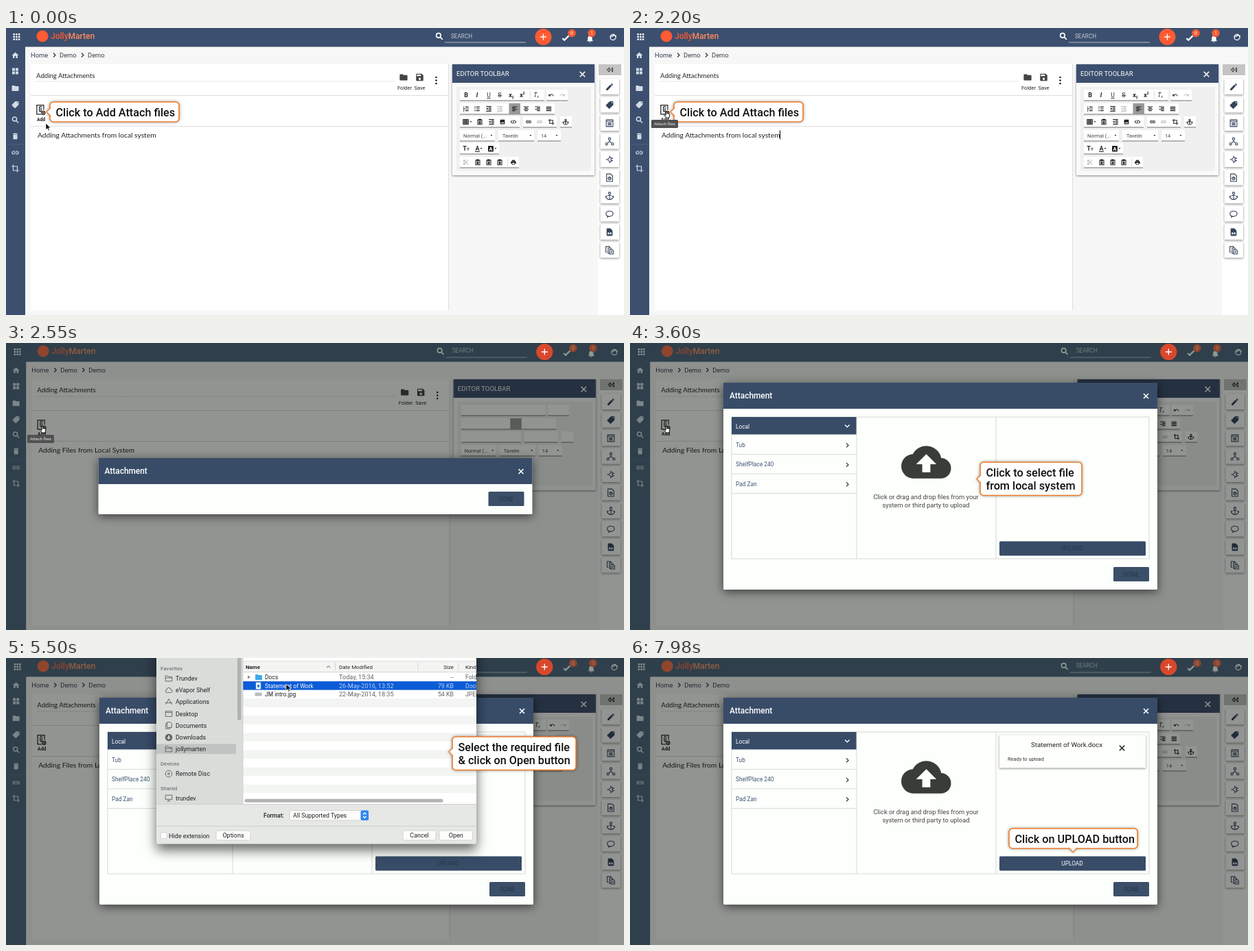
Animation, 900 px wide and 419 px high, one loop 8000 ms. Source, as an HTML page:

```html
<!DOCTYPE html>
<html lang="en">
<head>
<meta charset="utf-8">
<title>Adding attachments</title>
<style>
html, body { margin: 0; width: 100%; height: 100%; overflow: hidden; background: #f7f7f7; }
svg { display: block; width: 100vw; height: 100vh; font-family: Roboto, sans-serif; }
.sh { filter: drop-shadow(0 1px 1.5px #0007); }
.tip { filter: drop-shadow(0 0 2px #0006); }
.deep { filter: drop-shadow(0 3px 7px #0009); }
.float { filter: drop-shadow(0 9px 9px #0009); }
</style>
</head>
<body>
<svg id="stage" viewBox="0 0 900 419"></svg>
<script>
const NAVY = '#3c4f6e', ORANGE = '#ff5a32', INK = '#222', LATO = 'font-family="Lato, sans-serif"';

// Icons on a 24 unit grid; a leading ~ means stroked instead of filled.
const icons = {
  home: 'M10 20v-6h4v6h5v-8h3L12 3 2 12h3v8z',
  dash: 'M3 3h8v8H3zM13 3h8v8h-8zM3 13h8v8H3zM13 13h8v8h-8z',
  folder: 'M10 4H4a2 2 0 0 0-2 2v12a2 2 0 0 0 2 2h16a2 2 0 0 0 2-2V8a2 2 0 0 0-2-2h-8z',
  tag: 'M2.6 11.6l9-9A2 2 0 0 1 13 2h7a2 2 0 0 1 2 2v7a2 2 0 0 1-.6 1.4l-9 9a2 2 0 0 1-2.8 0l-7-7a2 2 0 0 1 0-2.8zM18.5 7a1.5 1.5 0 1 0 0-3 1.5 1.5 0 0 0 0 3z',
  search: '~M15 15l6 6M16 10a6 6 0 1 1-12 0 6 6 0 0 1 12 0',
  trash: 'M6 19a2 2 0 0 0 2 2h8a2 2 0 0 0 2-2V7H6zM19 4h-3.5l-1-1h-5l-1 1H5v2h14z',
  link: '~M11 8H7a4 4 0 0 0 0 8h4M13 8h4a4 4 0 0 1 0 8h-4M8 12h8',
  crop: '~M6 1v17h17M1 6h17v17',
  save: 'M17 3H5a2 2 0 0 0-2 2v14a2 2 0 0 0 2 2h14a2 2 0 0 0 2-2V7zM12 19a3 3 0 1 1 0-6 3 3 0 0 1 0 6zM15 9H5V5h10z',
  edit: 'M3 17.2V21h3.8L17.8 9.9l-3.7-3.7zM20.7 7a1 1 0 0 0 0-1.4l-2.3-2.3a1 1 0 0 0-1.4 0l-1.8 1.8 3.7 3.7z',
  bell: 'M12 22a2 2 0 0 0 2-2h-4a2 2 0 0 0 2 2zM18 16v-5c0-3-1.6-5.6-4.5-6.3V4a1.5 1.5 0 0 0-3 0v.7C7.6 5.4 6 8 6 11v5l-2 2v1h16v-1z',
  check: '~M2 12l6 6L22 4',
  undo: 'M12.5 8c-2.7 0-5 1-6.9 2.6L2 7v9h9l-3.6-3.6A8 8 0 0 1 20 16l2.4-.8A10.5 10.5 0 0 0 12.5 8z',
  redo: 'M11.5 8c2.7 0 5 1 6.9 2.6L22 7v9h-9l3.6-3.6A8 8 0 0 0 4 16l-2.4-.8A10.5 10.5 0 0 1 11.5 8z',
  anchor: '~M12 22V8a3 3 0 1 1 .1 0M7 11h10M2 13a10 9 0 0 0 20 0M2 17v-4h4M22 17v-4h-4',
  chat: '~M8 18c-9-3-7-14 4-14s13 11 2 14.5c-2 .5-3 0-4 0l-5 3z',
  note: '~M3 3h18v18H3zM3 7h18M7 11h10M7 14h10M7 17h10',
  share: '~M12 8v4L6 17M12 12l6 5M15 5a3 3 0 1 1-6 0 3 3 0 0 1 6 0M7 19a3 3 0 1 1-6 0 3 3 0 0 1 6 0M23 19a3 3 0 1 1-6 0 3 3 0 0 1 6 0',
  plug: '~M2 12h5l5-6h4v12h-4l-5-6M16 9h5M16 15h5M12 2v4M12 18v4',
  history: '~M4 2h11l5 5v15H4zM16 14a4 4 0 1 1-8 0 4 4 0 0 1 8 0M12 11v3h2',
  doc: 'M6 2a2 2 0 0 0-2 2v16a2 2 0 0 0 2 2h12a2 2 0 0 0 2-2V8l-6-6zM7 13h4v5H7zM13 13h4v5h-4z',
  copies: '~M5 17H2V2h10v4M8 6h8v4M8 6v14h4M12 10h7l3 3v9H12zM15 15h4M15 18h4',
  clip: '~M13 22H3V1h16v11M13 7v7a2 2 0 0 1-4 0V7a2.5 2.5 0 0 1 5-1M22 19a4 4 0 1 1-8 0 4 4 0 0 1 8 0M18 17v4M16 19h4',
  ol: '~M9 5h13M9 12h13M9 19h13M3 3v4M2 11h4M2 14h4M3 17v5',
  ul: '~M9 5h13M9 12h13M9 19h13M2 5h4M2 12h4M2 19h4',
  indent: '~M2 3h20M12 9h10M12 15h10M2 21h20M2 12h7M6 9l3 3-3 3',
  left: '~M2 4h20M2 9h12M2 14h20M2 19h12', mid: '~M2 4h20M6 9h12M2 14h20M6 19h12',
  right: '~M2 4h20M10 9h12M2 14h20M10 19h12', full: '~M2 4h20M2 9h20M2 14h20M2 19h20',
  table: '~M2 3h20v18H2zM2 9h20M2 15h20M9 3v18M15 3v18',
  image: 'M21 19V5a2 2 0 0 0-2-2H5a2 2 0 0 0-2 2v14a2 2 0 0 0 2 2h14a2 2 0 0 0 2-2zM8.5 13.5l2.5 3 3.5-4.5 4.5 6H5z',
  code: '~M8 6l-6 6 6 6M16 6l6 6-6 6M13 5l-2 14',
  cut: '~M8 8l13 13M8 16L21 3M8 6a3 3 0 1 1-6 0 3 3 0 0 1 6 0M8 18a3 3 0 1 1-6 0 3 3 0 0 1 6 0',
  paste: '~M4 4h16v18H4zM8 2h8v4H8zM8 11h8M8 15h8M8 18h8',
  print: 'M19 8H5a3 3 0 0 0-3 3v6h4v4h12v-4h4v-6a3 3 0 0 0-3-3zM16 19H8v-5h8zM18 3H6v4h12z',
  cloud: 'M19.35 10A7.5 7.5 0 0 0 5.35 8 6 6 0 0 0 6 20h13a5 5 0 0 0 .35-10zM14 13v4h-4v-4H7l5-5 5 5z',
  mist: '~M6 19a4 4 0 0 1 0-8 6 6 0 0 1 12-1 4.5 4.5 0 0 1 1 9z',
  apps: '~M3 20L12 3l9 17M1 15h22', desk: '~M2 4h20v16H2zM2 8h20',
  docs: '~M7 2h10l4 4v12H7zM7 6H3v16h13v-4',
  down: 'M12 1a11 11 0 1 0 .1 0zM10 6h4v6h4l-6 6-6-6h4z',
  disc: '~M22 12a10 10 0 1 1-20 0 10 10 0 0 1 20 0M15 12a3 3 0 1 1-6 0 3 3 0 0 1 6 0',
  screen: '~M2 3h20v13H2zM12 16v5M7 21h10',
  dir: '~M2 4h8l2 3h10v13H2zM2 10h20'
};

const R = (x, y, w, h, fill, more = '') => `<rect x="${x}" y="${y}" width="${w}" height="${h}" fill="${fill}" ${more}/>`;
const O = (x, y, r, fill, more = '') => `<circle cx="${x}" cy="${y}" r="${r}" fill="${fill}" ${more}/>`;
const T = (x, y, s, size, fill = INK, more = '') => `<text x="${x}" y="${y}" font-size="${size}" fill="${fill}" ${more}>${s}</text>`;
const C = (x, y, s, size, fill, more = '') => T(x, y, s, size, fill, 'text-anchor="middle" ' + more);
const L = (d, color, w = 1, more = '') => `<path d="${d}" fill="none" stroke="${color}" stroke-width="${w}" ${more}/>`;
const G = (id, body, more = '') => `<g id="${id}" ${more}>${body}</g>`;
const I = (name, x, y, size, color = INK, w = 2.4) => {
  const d = icons[name], k = size / 24, line = d[0] === '~';
  return `<path transform="translate(${x - size / 2} ${y - size / 2}) scale(${k})" d="${line ? d.slice(1) : d}" ` +
    (line ? `fill="none" stroke="${color}" stroke-width="${w}"/>` : `fill="${color}" fill-rule="evenodd"/>`);
};
const cross = (x, y, r, color) => L(`M${x - r} ${y - r}l${2 * r} ${2 * r}m0 ${-2 * r}l${-2 * r} ${2 * r}`, color, 1.6);
const caretDown = (x, y) => `<path d="M${x - 1.5} ${y - 1}h3l-1.5 2z" fill="#333"/>`;
const plusButton = color => O(782.5, 13, 12, color) + L('M778 13h9m-4.500-4.500v9', '#fff', 1.4);

function callout(id, x, y, w, h, lines, tip) {
  const tail = tip[0] < x
    ? `M${x + 1} ${tip[1] - 6}L${tip[0]} ${tip[1]}l${x + 1 - tip[0]} 6`
    : `M${tip[0] - 6} ${y + h - 1}L${tip[0]} ${tip[1]}l6 ${y + h - 1 - tip[1]}`;
  return G(id, R(x, y, w, h, '#fff', 'rx="5" stroke="#ef7d2b" stroke-width="1.6"') +
    `<path d="${tail}" fill="#fff" stroke="#ef7d2b" stroke-width="1.4"/>` +
    lines.map((s, i) => T(x + 8.5, y + 20.8 + i * 19, s, 16.2, '#111', 'font-weight="500"')).join(''),
    'class="tip"');
}

function topBar() {
  let s = R(-5, 0, 910, 27.5, NAVY) + R(-5, 0, 33, 419, NAVY);
  for (let i = 0; i < 9; i++) s += R(10.5 + i % 3 * 3.7, 8 + (i / 3 | 0) * 3.7, 2.4, 2.4, '#fff');
  s += O(53, 12, 8.5, ORANGE) + T(65, 16, 'Jolly<tspan fill="#ff8a5c">Marten</tspan>', 12, ORANGE, 'font-weight="500"');
  s += I('search', 631, 12, 13, '#fff', 3) + T(648, 14.5, 'SEARCH', 8.2, '#c3cad6') + R(639, 20.5, 118, 1, '#b4bccb');
  s += plusButton(ORANGE) + I('check', 815, 15, 11, '#fff', 5) + I('bell', 850.5, 15.5, 13, '#fff');
  [[824, '0'], [853, '1']].forEach(([x, n]) => s += O(x, 7.5, 5.7, ORANGE) + C(x, 10, n, 7, '#fff'));
  s += O(884, 13.5, 4, 'none', 'stroke="#fff" stroke-width="1.3"') + L('M880 12q5 1 5-3q1 3 4 3', '#fff', 1.3);
  'home dash folder tag search trash link crop'.split(' ').forEach((n, i) =>
    s += I(n, 13.5, [40, 63, 88, 112, 134, 158, 182, 205][i], 12, '#d5dbe5', n === 'search' ? 3 : 2.4));
  return s + R(0, 169.5, 27, .7, '#54658a');
}

function toolbar() {
  const strip = (x, y, w) => R(x, y - 8, w, 15.5, '#fff') + R(x, y + 7.5, w, 1, '#777');
  let s = R(650, 53, 207, 162, '#fafafa', 'class="sh"') + R(650, 53, 207, 27, NAVY) +
    T(656, 70, 'EDITOR TOOLBAR', 9.6, '#fff') + cross(839.5, 67.5, 3.7, '#fff') + R(656, 86, 196, 122.5, '#f0f0f0');
  [[661, 98, 123], [787, 98, 31], [661, 118, 138], [661, 137, 87], [753, 137, 49], [807, 137, 17],
    [661, 157, 51], [717, 157, 52], [774, 157, 34], [661, 176, 57], [661, 196, 86]].forEach(a => s += strip(...a));
  s += R(732.5, 110, 16.5, 16, '#999');
  [[666, 'Normal (...', 707], [723, 'Tavelin', 764], [779, '14', 802]].forEach(([x, t, c]) => s += T(x, 159.7, t, 7.3, '#444') + caretDown(c, 157));
  const row = (names, xs, y, pale) => names.split(' ').map((n, i) => I(n, xs[i], y, 9, i === pale ? '#bbb' : INK, 2.8)).join('');
  const b = 'font-weight="700"', tiny = (d, n) => `<tspan font-size="5" dy="${d}">${n}</tspan>`;
  let t = C(670, 101, 'B', 9, INK, b) + C(686, 101, 'I', 9, INK, b + ' font-style="italic"') +
    C(703, 101, 'U', 8.5, INK, 'text-decoration="underline"') + C(719, 101, 'S', 9, INK, 'text-decoration="line-through"') +
    C(736, 100.5, 'x' + tiny(2, 2), 9, INK, b) + C(752, 101, 'x' + tiny(-4, 2), 9, INK, b) +
    R(763, 92, .7, 12, '#ccc') + C(772, 101, 'T' + tiny(1, 'x'), 9, INK, 'font-style="italic"');
  t += row('undo redo', [794, 810], 98, 1) + row('ol ul indent indent', [670, 686, 703, 719], 118, 3) +
    row('left mid right full', [741, 757.5, 774, 790.5], 118) + row('table paste indent image code', [669.5, 690, 707, 723, 739], 137) +
    caretDown(677, 137) + row('link link crop', [761, 777, 794], 137, 1) + row('anchor', [815], 137);
  t += C(670, 179, 'T<tspan font-size="6">T</tspan>', 9, INK, b) + C(686.5, 179, 'A', 9, INK, b) + R(683, 180, 7, 1, INK) + caretDown(692, 176) +
    R(702, 172, 8, 8.5, INK, 'rx="1"') + C(706, 179, 'A', 7.5, '#fff', b) + caretDown(713, 176);
  t += row('cut paste paste paste', [670, 687, 703, 719], 196, 0) + R(730, 190, .7, 12, '#ccc') + row('print', [739], 196);
  return s + G('tools', t);
}

function page() {
  let s = R(-5, 0, 910, 419, '#f7f7f7') + R(36, 53, 608.5, 359, '#fff') + R(644, 53, 1, 359, '#ddd') + R(862, 53, 38, 366, '#fff');
  [[36, 'Home'], [78, 'Demo'], [119, 'Demo']].forEach(([x, t]) => s += T(x, 43, t, 9.4, '#333d4d'));
  s += L('M69 36.500l3 3-3 3M110 36.500l3 3-3 3', '#333', 1.2);
  s += T(44, 72.5, 'Adding Attachments', 9.65, INK, LATO) + L('M44 78h522', '#bbb', .8, 'stroke-dasharray="1 1"');
  s += I('folder', 579, 72, 13.5, '#444') + I('save', 602.5, 72, 14, '#444') + C(580.5, 90, 'Folder', 7.5, INK) + C(602.5, 90, 'Save', 7.5, INK);
  [72, 76.5, 81].forEach(y => s += O(626.5, y, 1.3, INK));
  s += R(36, 98, 608, 1, '#ddd') + R(36, 143, 608, 1, '#ddd') + I('clip', 50.5, 119.5, 15, INK, 2) + C(51, 135.5, 'Add', 6.8, INK, 'font-weight="700"');
  s += G('textA', T(46, 159.7, 'Adding Attachments from local system', 10.28, INK, LATO)) +
    G('textB', T(46, 159.7, 'Adding Files from Local System', 10.28, INK, LATO)) + G('caret', R(218, 149.5, 1, 13, '#000'));
  s += toolbar() + R(863, 53, 33, 16, '#c4c4c4') + L('M878.500 58l-3.500 3 3.500 3zM883.500 58l-3.500 3 3.500 3z', '#333', 1);
  'edit tag note share plug history anchor chat doc copies'.split(' ').forEach((n, i) => {
    const y = 86 + i * 26.5;
    s += R(865.5, y - 12, 27.5, 23, '#fff', 'class="sh"') + I(n, 879, y, 13, '#34435c', 2);
  });
  return s + topBar();
}

function dialog() {
  const blue = '#384c68';
  let list = R(148, 108, 608, 207, 'none', 'stroke="#d5d8d5"') + R(148, 108, 182, 25.5, blue) + L('M330 108v207M533 108v207', '#d5d8d5');
  list += T(154, 124.5, 'Local', 8.3, '#fff') + L('M313 119.500l3.300 3.300 3.300-3.300', '#fff', 1.3);
  ['Tub', 'ShelfPlace 240', 'Pad Zan'].forEach((t, i) => {
    const y = 149 + i * 28.5;
    list += T(154, y + 2.5, t, 8.3, '#3f5472') + L(`M315 ${y - 2.6}l3 3-3 3`, '#333', 1.3) + R(148, y + 13, 182, .8, '#d0d4d0');
  });
  list += I('cloud', 431.5, 174, 71, '#383d39') + C(431, 228, 'Click or drag and drop files from your', 9.36, '#444') +
    C(431, 240, 'system or third party to upload', 9.36, '#444');
  list += G('card', R(538, 112.5, 213, 48, '#fdfffc', 'class="sh"') + C(636, 129.5, 'Statement of Work.docx', 9.7, INK) +
    cross(716.5, 131.5, 3.7, INK) + T(550, 150, 'Ready to upload', 7.4, '#333'));
  list += R(538, 289.5, 213, 21, blue, 'rx="1.5"') + C(644, 303, 'UPLOAD', 8.4, '#26364a', 'id="upload"');
  return G('dialog', R(136, 58, 632, 302, '#fcfffb', 'id="sheet" rx="1.5" class="deep"') +
    G('head', R(136, 58, 632, 38, blue) + T(145, 81, 'Attachment', 11.9, '#fff', 'font-weight="500"') + cross(751.5, 77.5, 3.5, '#fff')) +
    G('list', list) +
    G('done', R(704, 327, 52, 21, '#3b4f68', 'rx="1.5"') + C(730, 340.5, 'DONE', 8.4, '#26364a')));
}

function fileList() {
  const rowH = 12.55, end = 'text-anchor="end"';
  let s = R(345, -20, 340, 233, '#fff');
  for (let i = 1; i < 15; i += 2) s += R(345, 21.5 + i * rowH, 340, rowH, '#f3f5f2');
  s += R(345, 5, 340, 15.5, '#f4f5f3') + R(345, 4.5, 340, .7, '#c6c6c6') + R(345, 20.3, 340, .7, '#c6c6c6') + L('M479.500 7v11M600 7v11M659 7v11', '#ccc', .8);
  s += T(349, 15.5, 'Name', 7.9, INK, 'font-weight="700"') + L('M467 14l2.500-2.500 2.500 2.500', '#555') + T(485, 15.5, 'Date Modified', 7.9) +
    T(652, 15.5, 'Size', 7.9, INK, end) + T(669, 15.5, 'Kind', 7.9);
  s += R(345, 21.5 + rowH, 340, rowH, '#0b5cd6', 'id="pick"');
  [['Docs', 'Today, 15:34', '--', 'Folder'], ['Statement of Work', '26-May-2016, 13:52', '79 KB', 'Document'],
    ['JM intro.jpg', '22-May-2014, 18:35', '54 KB', 'JPEG image']].forEach(([name, date, size, kind], i) => {
    const y = 31 + i * rowH;
    s += G('file' + i, T(377, y, name, 8.5, 'inherit') + '<g opacity=".7">' + T(485, y, date, 9.1, 'inherit') +
      T(652, y, size, 8.8, 'inherit', end) + T(669, y, kind, 8.6, 'inherit') + '</g>', `fill="${INK}"`);
  });
  s += '<path d="M352 25.500l4 2.500-4 2.500z" fill="#888"/>' + I('folder', 368, 28, 12, '#3fa9e8') +
    R(364, 35.5, 7, 10, '#fff', 'stroke="#6a9fd0" stroke-width=".7"') + R(366, 39, 3, 4, '#2f80c8') + R(362.5, 50.5, 10, 5, '#bbb');
  return s + R(347.5, 205.7, 289, 5, '#b3b3b3', 'rx="2.5"');
}

function picker() {
  const thin = 'stroke="#ccc" stroke-width=".8"';
  let s = R(219, -20, 466, 291.5, '#e5e8e4', 'rx="3" class="float"') + R(219, -20, 126, 233, '#d9dddA') +
    '<clipPath id="edge"><path d="M345-20h340v233h-340z"/></clipPath>' + G('files', fileList(), 'clip-path="url(#edge)"') +
    L('M345-20v233M219 213.500h466M219 245.500h466', '#c8cbc7', .8);
  s += R(337, -5, 5.5, 96, '#b0b3b1', 'rx="2.7"') + R(219, 125.5, 116, 14.5, '#bfc3c1');
  [[18, 'Favorites'], [157, 'Devices'], [192.5, 'Shared']].forEach(([y, t]) => s += T(225, y, t, 7.8, '#777', 'font-weight="500"'));
  [['dir', 30, 'Trundev'], ['mist', 47, 'eVapor Shelf'], ['apps', 64, 'Applications'], ['desk', 81.5, 'Desktop'], ['docs', 98.5, 'Documents'],
    ['down', 116, 'Downloads'], ['dir', 133, 'jollymarten'], ['disc', 169, 'Remote Disc'], ['screen', 204.5, 'trundev']].forEach(([n, y, t]) =>
    s += I(n, 237, y, 11.5, '#666', 2) + T(247, y + 3, t, 8.9));
  const button = (x, w, t, more = '') => R(x, 252, w, 14, '#fcfdfb', 'rx="2.5" ' + thin) + C(x + w / 2, 262, t, 9, INK, more);
  s += T(375, 232.7, 'Format:', 8.6, INK, 'font-weight="500"') + R(413, 222.5, 115, 14.5, '#fcfdfb', 'rx="2.5" ' + thin) +
    T(418, 233, 'All Supported Types', 8.8) + R(516.5, 222.5, 11.5, 14.5, '#2f86f0', 'rx="2"') +
    L('M520 228.500l2.300-2.500 2.300 2.500M520 231l2.300 2.500 2.300-2.500', '#fff', 1.2);
  s += R(225.5, 255, 8.5, 8.5, '#fff', 'rx="1.5" ' + thin) + T(237, 262.5, 'Hide extension', 9) +
    button(306, 50, 'Options') + button(578, 48, 'Cancel') + button(631, 48.5, 'Open', 'id="open"');
  return G('picker', s);
}

const cursors = G('cursor',
  G('arrow', '<path d="M0 0v9.500l2.300-2 1.600 3.500 1.500-.7-1.500-3.400h3z" fill="#000" stroke="#fff" stroke-width=".7"/>') +
  G('hand', '<path d="M-.8 1v5.500l-1.700-1.600-1 .8 3 4.300h4.500l1-5-1.300-.8-1.500-.3-1.300-.3V1q-.8-1.200-1.700 0z" fill="#fff" stroke="#000" stroke-width=".9"/>'));

document.getElementById('stage').innerHTML =
  G('page', page()) +
  G('dim', R(30, 27.5, 870, 392, '#070c09', 'opacity=".44"') + L('M0 13.750h900', '#223028', 27.5, 'opacity=".5"') +
    R(0, 27.5, 30, 391.5, '#223028', 'opacity=".5"') + G('plus', plusButton('#d9482c'), 'transform="translate(1.8)"')) +
  callout('tipAdd', 64, 108, 188, 29, ['Click to Add Attach files'], [59, 122.5]) +
  G('hint', R(31, 134, 39, 12, '#515151', 'rx="1.5"') + C(50.5, 142, 'Attach files', 6.2, '#eee')) +
  dialog() + picker() +
  callout('tipSelect', 510, 174, 148, 48.5, ['Click to select file', 'from local system'], [505, 198.5]) +
  callout('tipOpen', 650, 115, 180, 48.5, ['Select the required file', '&amp; click on Open button'], [645, 137]) +
  callout('tipUpload', 552, 249, 187, 29, ['Click on UPLOAD button'], [645, 283.5]) + cursors;

const $ = id => document.getElementById(id);
const show = (id, on) => $(id).style.display = on ? '' : 'none';
const move = (id, x, y) => $(id).setAttribute('transform', `translate(${x} ${y})`);
const ramp = (t, a, b) => Math.min(1, Math.max(0, (t - a) / (b - a)));
const ease = k => k * k * (3 - 2 * k);

// Cursor stops: time, x, y
const path = [[0, 58, 139], [1400, 58, 139], [1900, 53, 121], [3650, 53, 121], [4000, 431, 182], [4150, 431, 182], [4500, 254, 130.5],
  [4900, 254, 130.5], [5350, 408, 38], [5700, 408, 38], [6300, 649.5, 257], [8000, 649.5, 257]];

function draw(t) {
  const second = t >= 2400;
  $('page').setAttribute('transform', second ? 'translate(1.2 0) scale(1.0008 1)' : '');
  show('textA', !second);
  show('textB', second);
  show('caret', !second && t >= 1000 && t % 1000 < 500);
  show('tools', t < 2450 || t >= 2650);
  $('dim').style.opacity = ramp(t, 2400, 2500);
  show('tipAdd', !second);
  show('hint', t >= 2000 && t < 2700);

  const grow = ease(ramp(t, 2580, 2700)), rise = 110 * (1 - grow);
  show('dialog', t >= 2450);
  $('dialog').style.opacity = ramp(t, 2420, 2500);
  $('sheet').setAttribute('y', 58 + rise);
  $('sheet').setAttribute('height', 82 + 220 * grow);
  move('dialog', -1.5 * (1 - grow), 0);
  move('head', 0, rise);
  move('done', 0, -rise);
  show('list', grow === 1);

  show('tipSelect', t >= 2800 && t < 4050);
  show('picker', t >= 4050 && t < 6950);
  move('picker', 0, -300 * (1 - ease(ramp(t, 4050, 4200)) + ease(ramp(t, 6850, 6950))));
  show('tipOpen', t >= 4200 && t < 6850);
  const picked = t >= 5450;
  show('pick', picked);
  $('file1').setAttribute('fill', picked ? '#fff' : INK);
  $('open').setAttribute('fill', picked ? INK : '#aaa');

  const ready = t >= 6950;
  show('card', ready);
  $('upload').setAttribute('fill', ready ? '#fff' : '#26364a');
  show('tipUpload', t >= 7300);

  const i = path.findIndex(p => p[0] > t), a = path[i - 1], b = path[i], k = ease(ramp(t, a[0], b[0]));
  move('cursor', a[1] + (b[1] - a[1]) * k, a[2] + (b[2] - a[2]) * k);
  const onLink = t >= 1850 && t < 3700 || t >= 3950 && t < 4150;
  show('hand', onLink);
  show('arrow', !onLink);
  show('cursor', !ready);
}

const start = performance.now();
(function loop() {
  draw((performance.now() - start) % 8000);
  requestAnimationFrame(loop);
})();
</script>
</body>
</html>
```
